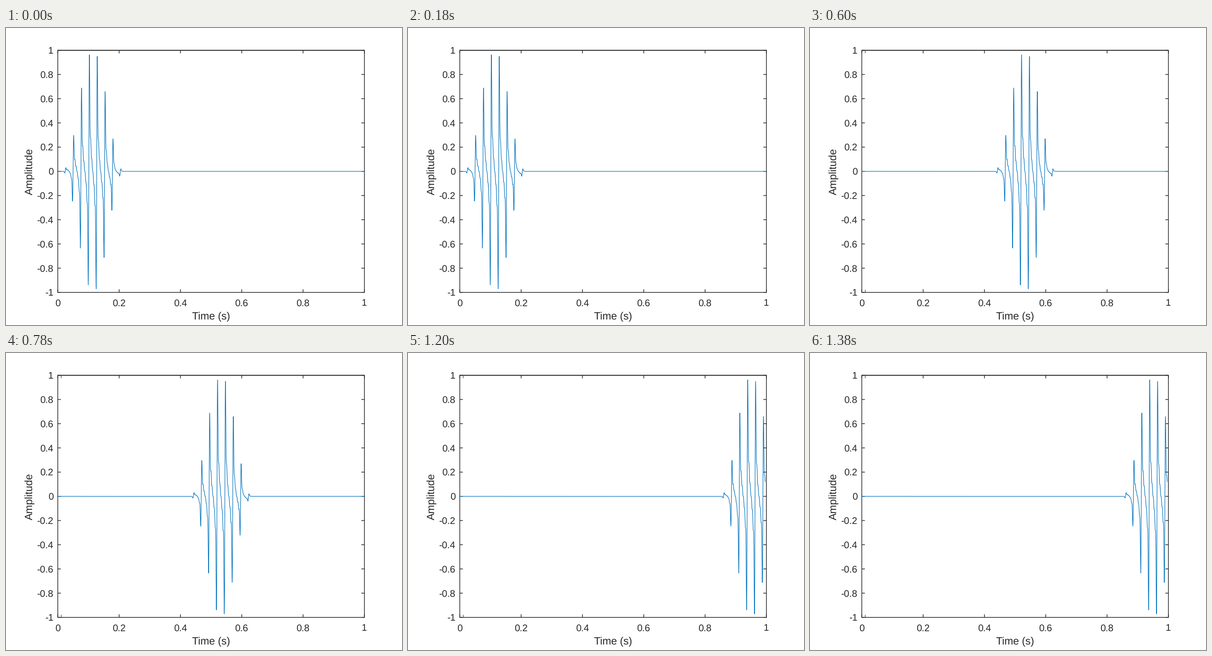
A matplotlib script for the animation above (1.5 s loop, 864 by 648 pixels).

```python
import numpy as np
import matplotlib.pyplot as plt
from matplotlib.animation import FuncAnimation

W, H, DPI = 864, 648, 150
LEFT, RIGHT, TOP, BOTTOM = 113, 782, 48.6, 576.8
MID = (TOP + BOTTOM) / 2
INK, BLUE = "#262626", "#0072BD"
PX = 72 / DPI  # points per pixel

SHIFTS = (0, 0.21, 0.418, 0.626, 0.836)  # pulse delay in seconds
PERIOD = 0.0257
CROSSING = 0.1012   # rising zero crossing near the middle of the pulse
CENTRE = 0.1149     # centre of the Hann window
WIDTH = 0.2
LAST = 0.9958       # the pulse is cut off here

plt.rcParams["font.family"] = "Liberation Sans"
plt.rcParams["axes.unicode_minus"] = False
plt.rcParams["text.hinting"] = "none"

fig = plt.figure(figsize=(W / DPI, H / DPI), dpi=DPI, facecolor="white")
ax = fig.add_axes([0, 0, 1, 1])
ax.set_xlim(0, W)
ax.set_ylim(H, 0)
ax.axis("off")


def to_x(t):
    return LEFT + t * (RIGHT - LEFT)


def to_y(v):
    return MID - v * (BOTTOM - TOP) / 2


def stroke(xs, ys, width=1.5):
    return ax.plot(xs, ys, color=INK, lw=width * PX, snap=False,
                   solid_capstyle="butt", solid_joinstyle="miter", zorder=2)[0]


def label(x, y, s, size=10, ha="center", rotation=0):
    ax.text(x, y, s, size=size, color=INK, ha=ha, va="baseline",
            rotation=rotation, rotation_mode="anchor")


def harmonics(phase):
    return sum((1 - n / 7) * np.sin(n * phase) for n in range(1, 7))


PEAK = harmonics(np.linspace(0, np.pi, 2000)).max()


def pulse(t):
    d = t - CENTRE
    window = np.where(np.abs(d) < WIDTH / 2, np.cos(np.pi * d / WIDTH) ** 2, 0)
    wave = harmonics(2 * np.pi * (t - CROSSING) / PERIOD)
    return 0.997 * window * wave / PEAK


# Box, ticks and labels
stroke([LEFT, RIGHT, RIGHT, LEFT, LEFT, RIGHT],
       [TOP, TOP, BOTTOM, BOTTOM, TOP, TOP])
TICK = 6.7
for i in range(6):
    x = to_x(i / 5)
    stroke([x, x], [BOTTOM, BOTTOM - TICK])
    stroke([x, x], [TOP, TOP + TICK])
    label(x - 0.3, 606.5, f"{i / 5:g}")
for i in range(-5, 6):
    y = to_y(i / 5)
    stroke([LEFT, LEFT + TICK], [y, y])
    stroke([RIGHT, RIGHT - TICK], [y, y])
    label(103.5, y + 7.4, f"{i / 5:g}", ha="right")
label(447.3, 636.3, "Time (s)", size=11)
label(57.8, MID, "Amplitude", size=11, rotation=90)

# Short marks beside the left corners, shown once the pulse has moved
marks = [stroke([120.5, 120.5], ys, 1) for ys in ((50, 55), (571, 576))]

time = np.linspace(0, 1, 6001)
curve, = ax.plot([], [], color=BLUE, lw=1.2 * PX, zorder=3)


def draw(i):
    y = pulse(time - SHIFTS[i])
    y[(time > LAST) & (y != 0)] = np.nan
    curve.set_data(to_x(time), to_y(y))
    for m in marks:
        m.set_visible(i > 0)
    return [curve, *marks]


anim = FuncAnimation(fig, draw, frames=len(SHIFTS), interval=300, repeat=True,
                     repeat_delay=0, blit=False)
plt.show()
```
